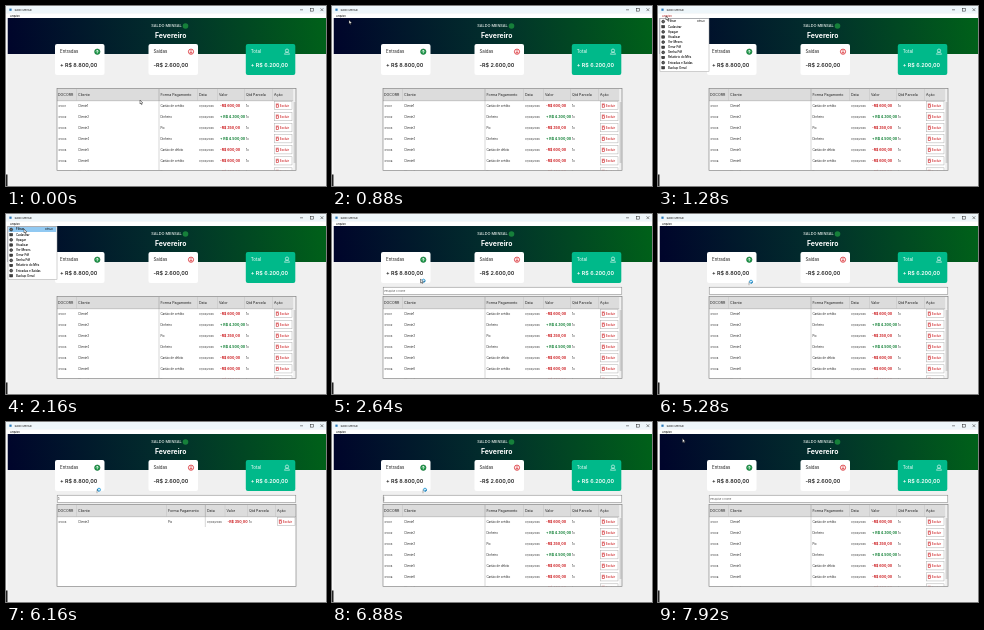
Animation of 320x180 px, one loop 8000 ms. Source, as an HTML page with a canvas:

```html
<!DOCTYPE html>
<html lang="pt-BR">
<head>
<meta charset="utf-8">
<title>Saldo Mensal</title>
<style>
html, body { margin: 0; width: 100%; height: 100%; overflow: hidden; background: #f0f0f0; }
canvas { display: block; width: 320px; height: 180px; }
</style>
</head>
<body>
<canvas id="stage"></canvas>
<script>
const LOOP = 8000, STEP = 80;
const canvas = document.getElementById('stage');
const ctx = canvas.getContext('2d');
const dpr = window.devicePixelRatio || 1;
canvas.width = 320 * dpr;
canvas.height = 180 * dpr;

const RED = '#cc1a1e', GREEN = '#0b7d30', INK = '#222';

const menuItems = ['Filtrar', 'Cadastrar', 'Apagar', 'Atualizar', 'Ver Meses',
  'Gerar Pdf', 'Senha Pdf', 'Relatório do Mês', 'Entradas e Saídas', 'Backup Geral'];

const rows = [
  ['Cartão de crédito', '-R$ 600,00'],
  ['Dinheiro', '+ R$ 4.300,00'],
  ['Pix', '-R$ 350,00'],
  ['Dinheiro', '+ R$ 4.500,00'],
  ['Cartão de débito', '-R$ 600,00'],
  ['Cartão de crédito', '-R$ 600,00'],
  ['Pix', '-R$ 450,00']
].map(([form, value], i) => ({ doc: '0100' + (i + 1), client: 'Cliente' + (i + 1), form, value }));

const wideCols = { form: 154.5, date: 193, value: 213, parts: 240, action: 268 };
const shortCols = { form: 162, date: 201, value: 220.5, parts: 243, action: 271 };

// time, x, y
const path = [
  [0, 134, 94], [720, 17, 14], [880, 17, 14], [1040, 8, 10], [1280, 8, 10],
  [1600, 18, 15], [2160, 18, 15], [2720, 90, 66], [7200, 90, 66],
  [7440, 85, 2], [7520, 85, 2], [7920, 24.5, 16.5], [8000, 24.5, 16.5]
];

const within = (t, a, b) => t >= a && t < b;

function rect(x, y, w, h, fill, stroke, width = 0.5) {
  if (fill) { ctx.fillStyle = fill; ctx.fillRect(x, y, w, h); }
  if (stroke) { ctx.strokeStyle = stroke; ctx.lineWidth = width; ctx.strokeRect(x, y, w, h); }
}

function text(s, x, y, size, color = INK, weight = 400, align = 'left') {
  ctx.font = `${weight} ${size}px Inter, "Open Sans", sans-serif`;
  ctx.textAlign = align;
  ctx.textBaseline = 'middle';
  ctx.fillStyle = color;
  ctx.fillText(s, x, y);
}

function line(points, color, width = 0.5) {
  ctx.beginPath();
  points.forEach(([x, y], i) => i ? ctx.lineTo(x, y) : ctx.moveTo(x, y));
  ctx.strokeStyle = color;
  ctx.lineWidth = width;
  ctx.stroke();
}

function circle(x, y, r, fill, stroke, width = 0.6) {
  ctx.beginPath();
  ctx.arc(x, y, r, 0, Math.PI * 2);
  if (fill) { ctx.fillStyle = fill; ctx.fill(); }
  if (stroke) { ctx.strokeStyle = stroke; ctx.lineWidth = width; ctx.stroke(); }
}

function drawWindow(t) {
  rect(0, 0, 320, 180, '#f0f0f0');
  rect(0, 0, 320, 7.5, '#eef6fa');
  rect(0, 7.5, 320, 4.5, '#fff');
  rect(3.4, 2.6, 2.2, 2.2, '#2878b8');
  text('Saldo Mensal', 8.5, 3.8, 2.7, '#222');
  line([[294, 3.8], [297, 3.8]], '#222');
  rect(304.5, 2.3, 2.8, 2.8, null, '#222');
  line([[314.5, 2.3], [317.3, 5.1]], '#222');
  line([[317.3, 2.3], [314.5, 5.1]], '#222');
  const active = within(t, 1200, 1600);
  text('Arquivo', 4, 9.9, 2.7, active ? '#b02020' : '#111', 500);

  const g = ctx.createLinearGradient(0, 48, 320, 12);
  g.addColorStop(0, '#00042b');
  g.addColorStop(0.5, '#022e2c');
  g.addColorStop(1, '#006119');
  rect(1.5, 12, 318.5, 36, g);
  rect(0, 12, 1.5, 156, '#fafafa');
  rect(0, 168.5, 1.5, 11.5, '#222');

  text('SALDO MENSAL', 160.5, 20, 3.9, '#eef4f1', 500, 'center');
  circle(179.5, 20, 2.8, '#16803a');
  text('Fevereiro', 164.7, 29.8, 6.9, '#fff', 700, 'center');
}

function card(x, label, value, fill, ink) {
  ctx.beginPath();
  ctx.roundRect(x, 38, 49.5, 31, 2);
  ctx.fillStyle = fill;
  ctx.fill();
  text(label, x + 5, 45.6, 4.4, ink);
  text(value, x + 5, 59.7, 5.4, ink, 600);
}

function drawCards() {
  card(49, 'Entradas', '+ R$ 8.800,00', '#fff', INK);
  circle(91.3, 45.7, 2.7, '#1f9a4a', '#0d6b30');
  line([[91.3, 47.3], [91.3, 44.2]], '#fff', 0.7);
  line([[90, 45.5], [91.3, 44.1], [92.6, 45.5]], '#fff', 0.7);

  card(142.5, 'Saídas', '-R$ 2.600,00', '#fff', INK);
  circle(185, 45.7, 2.6, '#fff', '#d8262c', 0.8);
  line([[185, 44], [185, 47.2]], '#d8262c', 0.7);
  line([[183.7, 45.9], [185, 47.3], [186.3, 45.9]], '#d8262c', 0.7);

  card(239.8, 'Total', '+ R$ 6.200,00', '#00b98a', '#fff');
  circle(281, 44.6, 1.6, null, '#fff');
  line([[278.5, 48.3], [279.3, 46.6], [282.7, 46.6], [283.5, 48.3], [278.5, 48.3]], '#fff');
}

function drawRow(row, y, c) {
  text(row.doc, 52.5, y, 2.7);
  text(row.client, 72, y, 2.8);
  text(row.form, c.form, y, 2.9);
  text('01/02/2023', c.date, y, 2.7);
  text(row.value, c.value + 1, y, 3.6, row.value[0] === '+' ? GREEN : RED, 700);
  text('1x', c.parts, y, 2.8);
  const x = c.action;
  rect(x + 0.5, y - 4.2, 17.5, 8.2, '#fff', '#adadad');
  rect(x + 2.2, y - 0.9, 2.2, 2.4, null, RED, 0.6);
  line([[x + 1.8, y - 1.7], [x + 4.8, y - 1.7]], RED, 0.6);
  text('Excluir', x + 5.8, y, 2.9, RED, 500);
}

function drawTable(single) {
  const c = single ? shortCols : wideCols;
  rect(51, 82.5, 239, 82, '#fff');
  rect(51, 82.5, 239, 12.2, '#dcdcdc');
  const heads = [['DOCORR', 52], ['Cliente', 72], ['Forma Pagamento', c.form], ['Data', c.date],
    ['Valor', c.value], ['Qtd Parcela', c.parts], ['Ação', c.action]];
  heads.forEach(([s, x], i) => {
    text(s, x, 88.7, 3.6);
    if (i) line([[x - 1.5, 83], [x - 1.5, 94.5]], '#bcbcbc', 0.4);
  });
  line([[51, 94.7], [290, 94.7]], '#9a9a9a');

  ctx.save();
  ctx.beginPath();
  ctx.rect(51, 95, 239, 69.3);
  ctx.clip();
  const shown = single ? [rows[single - 1]] : rows;
  shown.forEach((row, i) => drawRow(row, 99.7 + i * 11.05, c));
  ctx.restore();

  if (single) {
    line([[199.3, 83], [199.3, 105]], '#9a9a9a', 0.4);
  } else {
    line([[153, 83], [153, 164]], '#9a9a9a', 0.4);
    rect(287.2, 83, 2.6, 81, '#f0f0f0');
    rect(287.6, 96, 1.9, 61, '#cfcfcf');
  }
  rect(51, 82.5, 239, 82, null, '#777', 0.6);
}

function drawSearch(t) {
  if (t < 2240) return;
  rect(51.2, 73.2, 238.6, 7.4, '#fff', '#7a7a7a');
  if (t < 2800 || t >= 7680) {
    text('Pesquise o nome', 52.2, 76.9, 2.6, '#555');
    return;
  }
  const typed = within(t, 3920, 4640) ? '1' : within(t, 5520, 6400) ? '3' : '';
  text(typed, 51.8, 77.1, 2.8, '#333');
  const caretOff = within(t, 3360, 3920) || within(t, 5280, 5520) ||
    within(t, 6160, 6400) || t >= 7280;
  const x = typed ? 53.7 : 51.8;
  if (!caretOff) line([[x, 74.6], [x, 79.4]], '#333', 0.4);
}

function drawMenu(t) {
  if (!within(t, 1200, 2240)) return;
  rect(2, 12.3, 49, 53.2, '#fff', '#a5a5a5');
  if (t >= 1920) rect(2.6, 13, 47.5, 5, '#91c9f2');
  menuItems.forEach((s, i) => {
    const y = 15.6 + i * 5.13;
    if (i % 2) rect(3.8, y - 1.2, 2.8, 2.4, '#444', '#111');
    else circle(5.2, y, 1.4, '#666', '#111');
    text(s, 10, y, 2.9, '#000', 500);
  });
  text('Ctrl+F', 47, 15.6, 2.7, '#000', 500, 'right');
}

function position(t) {
  let i = 1;
  while (i < path.length - 1 && path[i][0] <= t) i++;
  const [t0, x0, y0] = path[i - 1], [t1, x1, y1] = path[i];
  const p = (t - t0) / (t1 - t0);
  const e = p * (2 - p);
  return [x0 + (x1 - x0) * e, y0 + (y1 - y0) * e];
}

function drawPointer(t) {
  const [x, y] = position(t);
  const busy = within(t, 2560, 7280);
  ctx.save();
  ctx.translate(x, y);
  if (busy) {
    circle(3, 1.7, 1.5, '#d5effa', '#2c9bd6', 0.9);
    const turn = within(t, 5920, 6880) ? 2 : 0;
    ctx.beginPath();
    ctx.arc(3, 1.7, 1.5, turn, turn + 1.5);
    ctx.strokeStyle = '#126ca8';
    ctx.stroke();
  }
  if (busy && t >= 2720) {
    line([[1, 1.6], [1, 5.2]], '#444', 0.4);
  } else {
    ctx.beginPath();
    [[0, 0], [0, 4], [0.9, 3.2], [1.5, 4.6], [2.1, 4.3], [1.5, 3], [2.8, 2.9]]
      .forEach(([a, b], i) => i ? ctx.lineTo(a, b) : ctx.moveTo(a, b));
    ctx.closePath();
    ctx.fillStyle = '#fff';
    ctx.fill();
    ctx.strokeStyle = '#222';
    ctx.lineWidth = 0.5;
    ctx.stroke();
  }
  ctx.restore();
}

function draw(now) {
  const t = Math.floor((now % LOOP) / STEP) * STEP;
  ctx.setTransform(dpr, 0, 0, dpr, 0, 0);
  const single = within(t, 4000, 4720) ? 1 : within(t, 5520, 6480) ? 3 : 0;
  drawWindow(t);
  drawCards();
  drawTable(single);
  drawSearch(t);
  drawMenu(t);
  drawPointer(t);
}

const start = performance.now();
function tick() {
  draw(performance.now() - start);
  requestAnimationFrame(tick);
}
tick();
</script>
</body>
</html>
```
